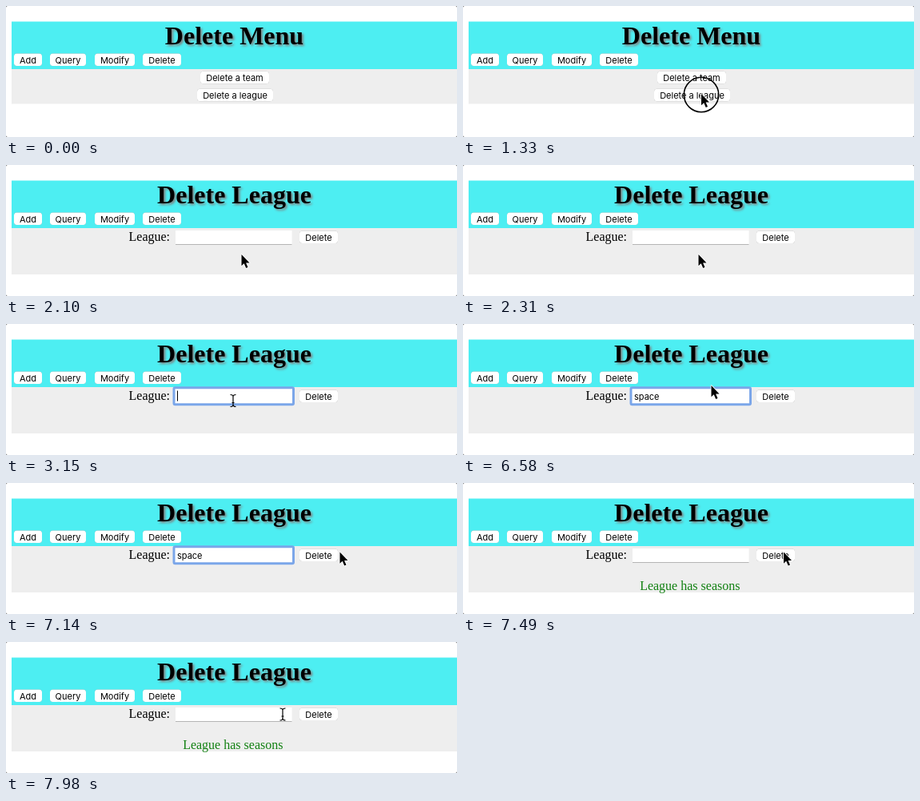
An HTML page for the animation above (8 s loop, 564 by 164 pixels).

```html
<!DOCTYPE html>
<html lang="en">
<head>
<meta charset="utf-8">
<title>Delete Menu</title>
<style>
html, body { margin: 0; width: 100%; height: 100%; overflow: hidden; background: #555; }
svg { display: block; background: #fff; border-radius: 2px; }
text { font: 16px "Liberation Serif", Tinos, serif; }
.mid { text-anchor: middle; }
#title { font-size: 32px; font-weight: bold; text-shadow: 2px 2px 3px gray; }
.ui { font: 11px Inter, sans-serif; }
.btn rect { fill: #fff; filter: drop-shadow(0 .5px .6px rgba(0, 0, 0, .4)); }
</style>
</head>
<body>
<svg width="564" height="164" viewBox="0 0 564 164">
  <rect x="7" y="19.5" width="557" height="59.5" fill="#4deef2"/>
  <rect id="panel" x="7" y="79" width="557" fill="#eee"/>
  <text id="title" class="mid" x="285.5" y="48"></text>
  <g id="nav"></g>
  <g id="menu"></g>
  <g id="form">
    <text x="153.5" y="95">League:</text>
    <rect x="212" y="82" width="145.5" height="17.5" fill="#fff"/>
    <path d="M212 99.5h145.5" stroke="#b5b5b5"/>
    <rect id="ring" x="210" y="79.7" width="149.5" height="21" rx="1.5" fill="#fff" stroke="#7ba6e9" stroke-width="3"/>
    <text id="typed" class="ui" x="214" y="94.5"></text>
    <path id="caret" d="M.5 83.5v13" stroke="#000"/>
  </g>
  <text id="message" class="mid" x="283.8" y="134" fill="#118011">League has seasons</text>
  <circle id="click" r="21.7" fill="none" stroke="#000" stroke-width="1.6"/>
  <path id="arrow" d="M0 0V14.2L3.2 11.3L5.7 17L8 16L5.6 10.4H10Z" stroke="#fff" stroke-width="1.6" stroke-linejoin="round" paint-order="stroke"/>
  <path id="beam" d="M-3.5-7.5Q0-7.5 0-5Q0-7.5 3.5-7.5M0-5V5M-3.5 7.5Q0 7.5 0 5Q0 7.5 3.5 7.5M-1.5 2.5h3" fill="none" stroke="#000" stroke-width="1.2"/>
</svg>
<script>
const LOOP = 8000, STEP = 70;
const $ = id => document.getElementById(id);
const show = (id, on) => $(id).style.display = on ? '' : 'none';
const place = (id, x, y) => $(id).setAttribute('transform', `translate(${x} ${y})`);
const between = (t, a, b) => t >= a && t < b;

function button(parent, label, x, y, w) {
  $(parent).insertAdjacentHTML('beforeend',
    `<g class="btn"><rect x="${x}" y="${y}" width="${w}" height="15.5" rx="3.5"/>
     <text class="ui mid" x="${x + w / 2}" y="${y + 12}">${label}</text></g>`);
}
button('nav', 'Add', 10, 59.5, 35);
button('nav', 'Query', 55, 59.5, 45);
button('nav', 'Modify', 111, 59.5, 50);
button('nav', 'Delete', 171, 59.5, 48);
button('menu', 'Delete a team', 243, 81.7, 86);
button('menu', 'Delete a league', 239, 103.7, 95);
button('form', 'Delete', 367, 82.5, 48);

// pointer path: time, x, y
const path = [
  [70, 283, 159], [210, 288, 138], [420, 295, 116], [630, 298, 110],
  [1959, 298, 110], [1960, 294.5, 112], [2660, 294.5, 112], [2940, 284, 96],
  [6579, 284, 96], [6580, 310.5, 77], [6720, 345, 64], [6860, 400, 62],
  [7000, 437, 80], [7140, 417.5, 86.5], [7280, 401, 86.5],
  [7770, 401, 86.5], [7980, 346, 90.5]
];
function pointer(t) {
  const i = path.findIndex(p => p[0] > t);
  if (i < 1) return (i ? path[path.length - 1] : path[0]).slice(1);
  const [a, b] = [path[i - 1], path[i]];
  const k = (t - a[0]) / (b[0] - a[0]);
  return [a[1] + (b[1] - a[1]) * k, a[2] + (b[2] - a[2]) * k];
}

const keyTimes = [4550, 4760, 5180, 5390, 5600];
const clicks = [1330, 3010, 7350];

function draw(t) {
  const onForm = t >= 2100, done = t >= 7490;
  $('title').textContent = onForm ? 'Delete League' : 'Delete Menu';
  $('panel').setAttribute('height', onForm ? 58 : 43.5);
  show('menu', !onForm);
  show('form', onForm);
  show('message', done);

  show('ring', between(t, 3010, 7490));
  $('typed').textContent = done ? '' : 'space'.slice(0, keyTimes.filter(k => t >= k).length);
  show('caret', between(t, 3010, 3640) || between(t, 4200, 6090) || between(t, 6650, 7140));
  place('caret', 214 + Math.round(onForm ? $('typed').getComputedTextLength() : 0), 0);

  const [x, y] = pointer(t);
  const visible = between(t, 70, 4550) || t >= 6580;
  const overField = onForm && between(x, 211, 358) && between(y, 81, 100);
  place('arrow', x, y);
  place('beam', x, y);
  place('click', x, y + 1);
  show('arrow', visible && !overField);
  show('beam', visible && overField);
  show('click', clicks.some(c => between(t, c, c + STEP)));
}

const start = performance.now();
function tick() {
  const t = (performance.now() - start) % LOOP;
  draw(Math.floor(t / STEP) * STEP);
  requestAnimationFrame(tick);
}
tick();
</script>
</body>
</html>
```
